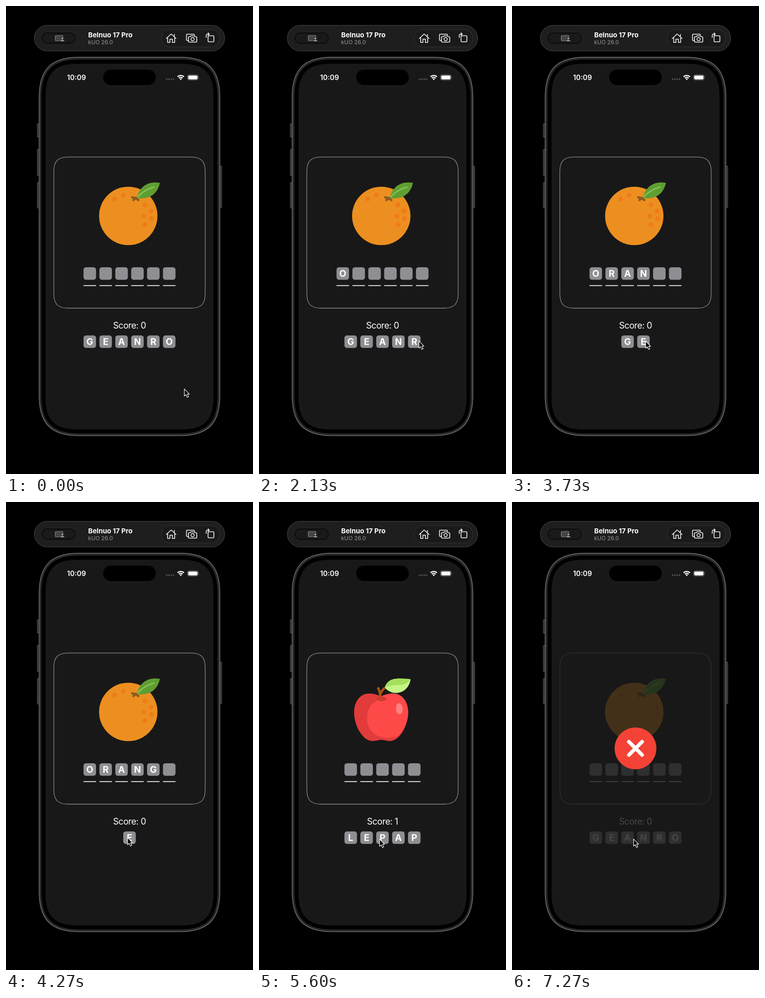
Recreate the animation shown at these times as an HTML page. Size 544 by 1030 pixels, loop 8 s.

```html
<!DOCTYPE html>
<html lang="en">
<head>
<meta charset="utf-8">
<title>Word game</title>
<style>
  html, body { margin: 0; height: 100%; background: #000; overflow: hidden; }
  svg { display: block; width: 100%; height: 100%; }
  text { font-family: Inter, Roboto, sans-serif; fill: #fff; }
  .icon { fill: none; stroke: #fff; stroke-width: 1.6; stroke-linejoin: round; stroke-linecap: round; }
  .side { fill: #2a2a2a; stroke: #626262; }
  .letter { font-size: 20px; font-weight: 700; text-anchor: middle; }
  .score { font-size: 19.5px; letter-spacing: -.55px; text-anchor: middle; }
</style>
</head>
<body>
<svg viewBox="0 0 544 1030">
  <!-- toolbar -->
  <rect x="62.5" y="42.5" width="419" height="56.5" rx="28" fill="#1e1e1e" stroke="#4b4b4b"/>
  <rect x="79.5" y="59.5" width="73" height="22.5" rx="11.2" fill="#1a1a1a" stroke="#050505" stroke-width="1.3"/>
  <rect x="108.5" y="65" width="17" height="11.5" rx="2" fill="#444" stroke="#8c8c8c" stroke-width="1.2"/>
  <g fill="#a0a0a0" stroke="#1a1a1a"><circle cx="124" cy="71.5" r="2.8"/><path d="M119 78q0-4 5-4t5 4z"/></g>
  <text x="181" y="68.5" font-size="15" font-weight="700">Belnuo 17 Pro</text>
  <text x="181" y="84" font-size="12.3" style="fill:#989898">kUO 26.0</text>
  <rect x="342" y="51.5" width="128.5" height="38.5" rx="19.2" fill="#1a1a1a" stroke="#353535"/>
  <g class="icon">
    <path d="M353 71.5 363.8 61.5 374.5 71.5M356 70V80.3H361V73H366.5V80.3H371.5V70M370.8 66.5V62.5"/>
    <path d="M402 76H399.5Q397.5 76 397.5 74V64Q397.5 62 399.5 62H413Q415 62 415 64"/>
    <path d="M403.8 67.5H406L407.5 65.5H414.5L416 67.5H418.2Q420.2 67.5 420.2 69.5V77.5Q420.2 79.5 418.2 79.5H403.8Q401.8 79.5 401.8 77.5V69.5Q401.8 67.5 403.8 67.5Z"/>
    <circle cx="411" cy="73" r="3.6"/>
    <rect x="445" y="65.5" width="12.8" height="13.2" rx="2"/>
    <path d="M441 69.5V65.5Q441 61.8 444.5 61.8H447.5M445 59.2 447.7 61.8 445 64.4"/>
  </g>

  <!-- phone -->
  <g class="side">
    <path d="M73 259.5H69V288.5H73M73 315.5H69V373H73M73 388.5H69V444.5H73M471 352.5H475V444H471"/>
  </g>
  <path id="body" fill="#292929" stroke="#828282" stroke-width="1.3"/>
  <path id="bezel"/>
  <path id="screen" fill="#181818"/>
  <rect x="214" y="140" width="116" height="34" rx="17"/>
  <text x="134.5" y="162.5" font-size="15.4" font-weight="600">10:09</text>
  <g fill="#555"><circle cx="354" cy="161" r="1.8"/><circle cx="359" cy="161" r="1.8"/><circle cx="364" cy="161" r="1.8"/><circle cx="369" cy="161" r="1.8"/></g>
  <g fill="none" stroke="#fff" stroke-width="2.6">
    <path d="M377.9 155.8a10 10 0 0 1 14 0M380.7 158.9a6 6 0 0 1 8.4 0"/>
    <path d="M384.9 163.2 382.6 160.9a3.3 3.3 0 0 1 4.6 0z" fill="#fff" stroke="none"/>
  </g>
  <rect x="399.8" y="151.5" width="23.4" height="11.4" rx="3.6" fill="none" stroke="#8a8a8a"/>
  <rect x="401.3" y="153" width="20.4" height="8.4" rx="2.3" fill="#fff"/>
  <path d="M424.5 155.3q1.8 1.9 0 3.8z" fill="#8a8a8a"/>

  <g id="content">
    <path id="card" fill="none" stroke="#8e8e90" stroke-width="1.3"/>
    <g id="orange">
      <circle cx="269.3" cy="462" r="64.3" fill="#ec8f20"/>
      <g fill="#f07b1a">
        <circle cx="239.4" cy="424.6" r="5.3"/><circle cx="258.2" cy="416.2" r="5.3"/><circle cx="306" cy="437.5" r="5.3"/>
        <circle cx="319.6" cy="451.2" r="5.3"/><circle cx="303.6" cy="462" r="5.3"/><circle cx="320.6" cy="467.6" r="5.3"/><circle cx="306.2" cy="481" r="5.3"/>
      </g>
      <path d="M276 420.8Q286 421.5 293 428.5M279.5 428.8Q283 423 291 420.5" fill="none" stroke="#8d5a20" stroke-width="4.8"/>
      <path d="M288 422.5C293 400 311 384 339 389.3C334 413 316 427 288 422.5Z" fill="#5f9e33"/>
      <path d="M289.5 420.5Q303 405 326 398.3" fill="none" stroke="#87c352" stroke-width="2.8" stroke-linecap="round"/>
    </g>
    <g id="apple">
      <path d="M269 428C262 424 252 421.5 243 421.5C222 421.5 209.5 440 209.5 463C209.5 492 228 526 250 526C258 526 262 523.5 269 523.5C276 523.5 280 526 288 526C310 526 328.5 492 328.5 463C328.5 440 316 421.5 295 421.5C286 421.5 276 424 269 428Z" fill="#e13c3b"/>
      <path d="M269 428C276 424 286 421.5 295 421.5C316 421.5 328.5 440 328.5 463C328.5 483 319 503 306 515.5Q296 519 283 519C255 519 238 500 238 476C238 455 249 439 265 436Z" fill="#fd4a49"/>
      <path d="M257 432.5Q269 444 282 433.5Q276 428 269 428Z" fill="#d63635"/>
      <ellipse cx="309" cy="455" rx="7.5" ry="12" fill="#ff8180" transform="rotate(-5 309 455)"/>
      <path d="M261.5 408Q267 416 268.5 437M268 422Q270 415 277 409" fill="none" stroke="#ad5414" stroke-width="5"/>
      <path d="M277 408.5C285 384 309 388 334 390C330 414 312 422 297 420Q285 418 277 408.5Z" fill="#c5f487"/>
      <path d="M277 408.5C285 384 309 388 334 390C323 406 308 402 297 403.5Q286 405 277 408.5Z" fill="#a3e15d"/>
    </g>
    <g id="tiles"></g>
  </g>

  <g id="badge">
    <circle id="disc" cx="272" cy="542.2" r="46"/>
    <path id="mark" fill="none" stroke="#fff"/>
  </g>
  <path id="cursor" d="M.8 .8V16.4L4.3 13.2 7.1 19.2 10 17.9 7.3 12.1H11.8Z" stroke="#fff" stroke-width="1.2" stroke-linejoin="round"/>
</svg>
<script>
const $ = id => document.getElementById(id);
const FPS = 15, FRAMES = 120, PITCH = 35, SIZE = 27.6;

// Rounded box with continuous corners; e is the length of a corner along each side.
function squircle(id, x, y, r, b, e) {
  const c = e * .3;
  $(id).setAttribute('d', `M${x + e} ${y}H${r - e}C${r - c} ${y} ${r} ${y + c} ${r} ${y + e}
    V${b - e}C${r} ${b - c} ${r - c} ${b} ${r - e} ${b}H${x + e}C${x + c} ${b} ${x} ${b - c} ${x} ${b - e}
    V${y + e}C${x} ${y + c} ${x + c} ${y} ${x + e} ${y}Z`);
}
squircle('body', 73, 112.7, 471, 945.7, 88);
squircle('bezel', 78, 117.7, 466, 940.7, 82);
squircle('screen', 87, 127, 457, 932, 70);
squircle('card', 105.4, 332.4, 438.6, 665, 31);

// Times below are in ticks of 1/15 s.
const rounds = [
  { start: 0, word: 'ORANGE', pool: 'GEANRO', score: 0 },
  { start: 67, word: 'APPLE', pool: 'LEPAP', score: 1, right: true },
  { start: 108, word: 'ORANGE', pool: 'GEANRO', score: 0, right: false }
];
const picks = [[28, 'O'], [36, 'R'], [48, 'A'], [51, 'N'], [64, 'G'], [91, 'P'], [96, 'E'], [99, 'A'], [104, 'L']];
const path = [
  [10, 392, 842], [16, 350.5, 758], [22, 358, 738], [23, 358, 738], [25, 357, 736.5], [31, 357, 736.5],
  [33, 346, 736.5], [36, 346, 736.5], [47, 298.5, 736.5], [54, 298.5, 736.5], [62, 267, 738], [70, 267, 738],
  [76, 262.5, 742], [78, 262.5, 742], [80, 264, 741.5], [82, 264, 741.5], [88, 267, 741]
];

function cursorAt(tick) {
  const next = path.findIndex(p => p[0] > tick);
  if (next < 0) return path[path.length - 1].slice(1);
  if (next === 0) return path[0].slice(1);
  const a = path[next - 1], b = path[next];
  const u = (tick - a[0]) / (b[0] - a[0]), s = u * u * (3 - 2 * u);
  return [a[1] + (b[1] - a[1]) * s, a[2] + (b[2] - a[2]) * s];
}

function row(letters, count, y) {
  return Array.from({ length: count }, (_, i) => {
    const x = 272 + (i - (count - 1) / 2) * PITCH;
    return `<rect x="${x - SIZE / 2}" y="${y}" width="${SIZE}" height="${SIZE}" rx="5.5" fill="#8f8e93"/>
      <text class="letter" x="${x}" y="${y + 21.2}">${letters[i] || ''}</text>`;
  }).join('');
}

function underlines(count) {
  const left = 272 - (count - 1) / 2 * PITCH - SIZE / 2;
  return `<path stroke="#fff" stroke-width="1.8" d="${Array.from({ length: count },
    (_, i) => `M${left + i * PITCH} 615.4h${SIZE}`).join('')}"/>`;
}

function draw(tick) {
  const round = rounds.filter(r => r.start <= tick).pop();
  const placed = picks.filter(([at]) => at >= round.start && at <= tick).map(p => p[1]);
  const pool = placed.reduce((rest, letter) => rest.replace(letter, ''), round.pool);
  const count = round.word.length;
  $('tiles').innerHTML = row(placed, count, 575) + underlines(count) + row(pool, pool.length, 724.9)
    + `<text class="score" x="272" y="710">Score: ${round.score}</text>`;
  $('orange').style.display = count === 6 ? '' : 'none';
  $('apple').style.display = count === 5 ? '' : 'none';

  const age = tick - round.start;
  const shown = round.start === 0 || age > 15 ? 0 : age === 0 || age === 15 ? .5 : 1;
  $('content').setAttribute('opacity', 1 - .8 * shown);
  $('badge').setAttribute('opacity', shown);
  $('disc').setAttribute('fill', round.right ? '#4caf50' : '#f44336');
  const mark = $('mark');
  mark.setAttribute('d', round.right ? 'M249.5 544.5 263 556.7 294.7 525.5' : 'M257.5 527.7 286.5 556.7M286.5 527.7 257.5 556.7');
  mark.setAttribute('stroke-width', round.right ? 11 : 8);
  mark.setAttribute('stroke-linecap', round.right ? 'butt' : 'round');
  $('cursor').setAttribute('transform', `translate(${cursorAt(tick)})`);
}

let last = -1;
function loop() {
  // The small lead absorbs rounding at tick boundaries.
  const tick = Math.floor((performance.now() + 5) * FPS / 1000) % FRAMES;
  if (tick !== last) draw(last = tick);
  requestAnimationFrame(loop);
}
loop();
</script>
</body>
</html>
```
